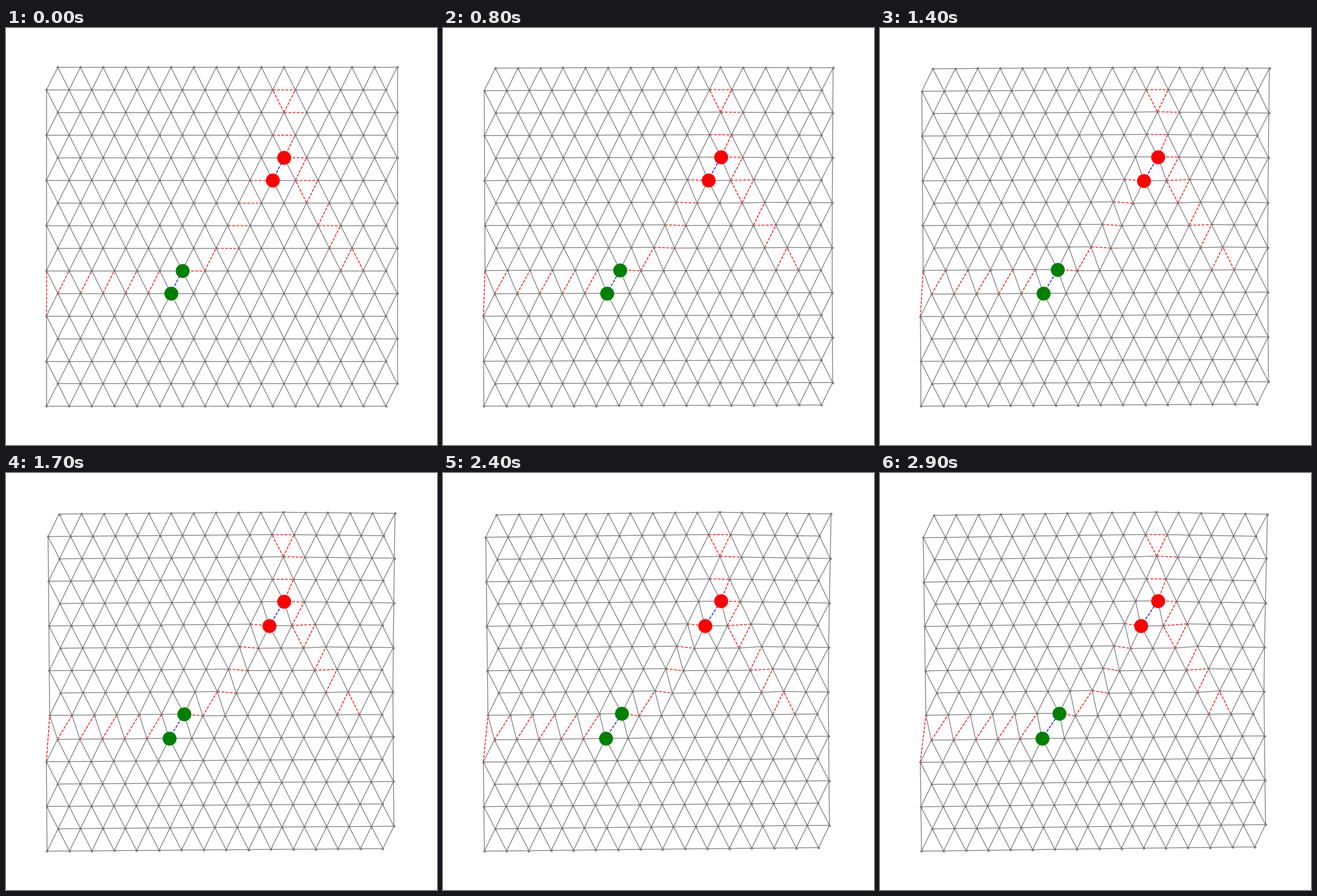
A matplotlib script for the animation above (3 s loop, 760 by 737 pixels).

```python
import numpy as np
import matplotlib.pyplot as plt
from matplotlib.animation import FuncAnimation
from matplotlib.collections import LineCollection

W, H, DPI = 760, 737, 100
N, FRAMES = 16, 30
LEFT, RIGHT, TOP, BOTTOM = 71.4, 689.7, 69.4, 668.4
DX = (RIGHT - LEFT) / (N - 0.5)
DY = (BOTTOM - TOP) / (N - 1)
SHRINK = 0.018  # overall contraction at the end of the loop


def node(r, i):
    return r * N + i


def step(r, i, move):
    """Neighbour of lattice site (r, i) in a compass direction."""
    if move in ("E", "W"):
        return r, i + (1 if move == "E" else -1)
    rise = 1 if move[0] == "N" else -1
    return r + rise, i + r % 2 - (move[1] == "W")


def walk(r, i, moves):
    edges = []
    for move in moves.split():
        nxt = step(r, i, move)
        edges.append(tuple(sorted((node(r, i), node(*nxt)))))
        r, i = nxt
    return edges


def lattice():
    edges = []
    for r in range(N):
        for i in range(N):
            for move in ("E", "NW", "NE"):
                s, j = step(r, i, move)
                if s < N and 0 <= j < N:
                    edges.append((node(r, i), node(s, j)))
        # zigzag sides are closed by straight bonds
        if r < N - 2:
            side = (N - 1) * (r % 2)
            edges.append((node(r, side), node(r + 2, side)))
    return edges


pruned = [(node(4, 0), node(6, 0))]
for k in range(5):
    pruned += walk(5, k, "NE")
for r, i in ((10, 9), (9, 8), (8, 8)):
    pruned += walk(r, i, "E")
pruned += walk(7, 8, "W SW W")
pruned += walk(13, 11, "W NW E SW")
pruned += walk(12, 10, "E SW E SW E SW NW")
pruned += walk(9, 12, "SW E SW")
pruned += walk(6, 13, "NE SE")
driven = walk(5, 5, "NE") + walk(10, 10, "NE")

gone = set(pruned + driven)
bonds = [e for e in lattice() if e not in gone]
rest = np.array([(LEFT + DX * (i + 0.5 * (r % 2)), BOTTOM - DY * r)
                 for r in range(N) for i in range(N)])

# Total travel of a few key nodes; the springs settle all others
travel = {
    (0, 0): (1.8, 0), (0, 15): (-9, -7.5),
    (15, 0): (3.6, 5.6), (15, 10): (-2.8, 0.1), (15, 15): (-6.4, 3.2),
    (4, 0): (-0.3, 2.3), (6, 0): (9.6, -0.2),
    (5, 5): (-5.6, 0), (6, 6): (5.6, -3.6),
    (10, 10): (-10.4, 1), (11, 10): (0, -2.9),
}


def relax():
    """Least-squares displacement of the spring network."""
    rows, rhs = [], []
    for a, b in bonds:
        d = rest[b] - rest[a]
        length = np.hypot(*d)
        row = np.zeros((N * N, 2))
        row[b], row[a] = d / length, -d / length
        rows.append(row.ravel())
        rhs.append(-SHRINK * length)
    for site, move in travel.items():
        for axis in (0, 1):
            row = np.zeros((N * N, 2))
            row[node(*site), axis] = 1
            rows.append(row.ravel())
            rhs.append(move[axis])
    u = np.linalg.lstsq(np.array(rows), np.array(rhs), rcond=None)[0]
    return u.reshape(-1, 2)


shift = relax()

fig = plt.figure(figsize=(W / DPI, H / DPI), dpi=DPI, facecolor="white")
ax = fig.add_axes([0, 0, 1, 1])
ax.set_xlim(0, W)
ax.set_ylim(H, 0)
ax.axis("off")


def add_lines(edges, color, style, z):
    edges = np.array(edges)
    lines = LineCollection(rest[edges], colors=color, linewidths=1,
                           linestyles=style, zorder=z)
    ax.add_collection(lines, autolim=False)
    return lines, edges


def add_dots(nodes, color, diameter, z):
    nodes = np.array(nodes)
    size = (diameter * 72 / DPI) ** 2
    dots = ax.scatter(*rest[nodes].T, s=size, c=color, linewidths=0, zorder=z)
    return dots, nodes


line_sets = [add_lines(bonds, "gray", "solid", 1),
             add_lines(pruned, "red", "dashed", 2),
             add_lines(driven, "blue", "dashed", 2)]
dot_sets = [add_dots(range(N * N), "gray", 4.5, 3),
            add_dots(driven[0], "green", 24.6, 4),
            add_dots(driven[1], "red", 24.6, 4)]


def draw(frame):
    pos = rest + shift * frame / (FRAMES - 1)
    for lines, edges in line_sets:
        lines.set_segments(pos[edges])
    for dots, nodes in dot_sets:
        dots.set_offsets(pos[nodes])
    return [artist for artist, _ in line_sets + dot_sets]


anim = FuncAnimation(fig, draw, frames=FRAMES, interval=100, repeat=True)
plt.show()
```
